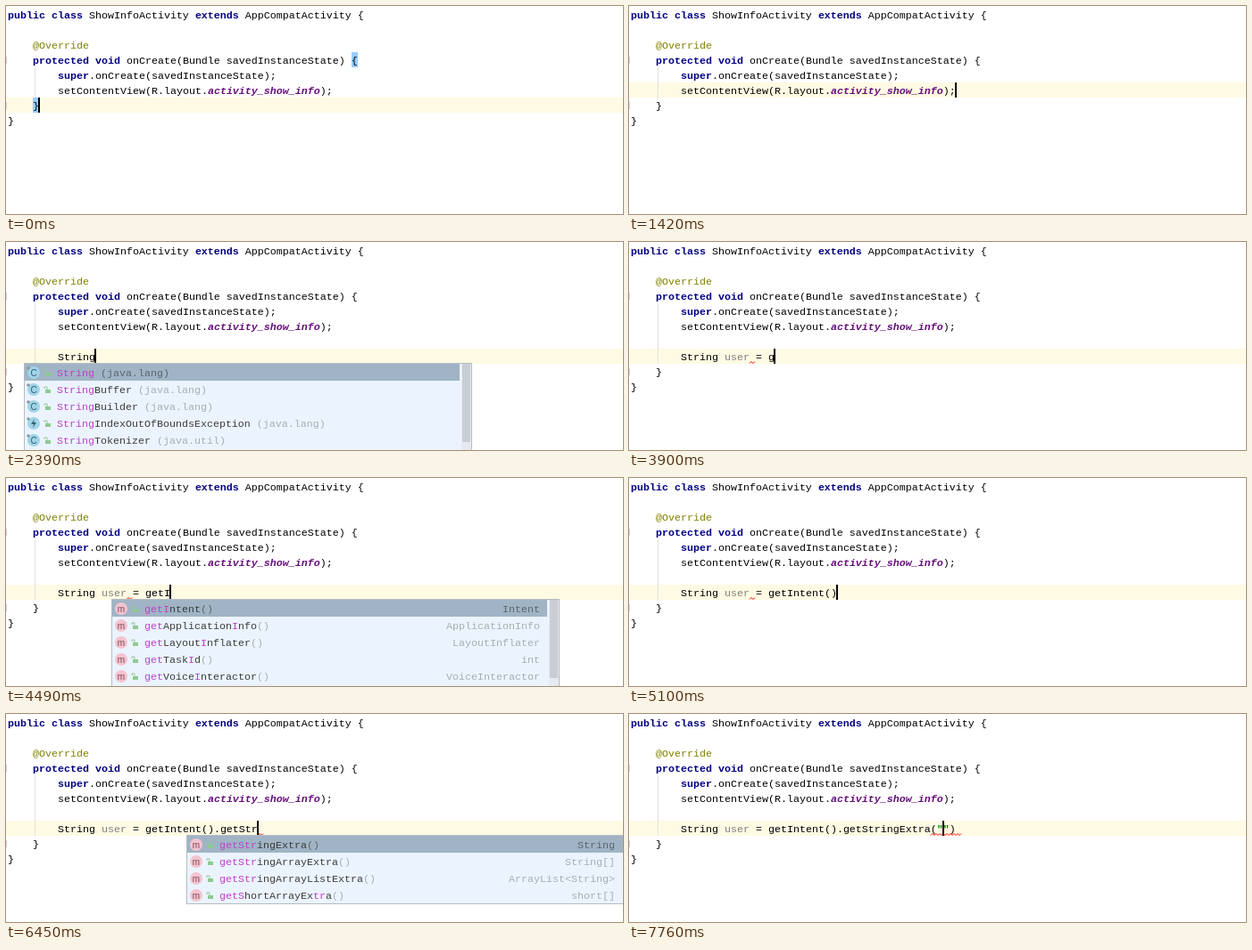
These frames come from a looping animation (691x234 px, 8 s). An HTML page:

```html
<!DOCTYPE html>
<html lang="en">
<head>
<meta charset="utf-8">
<title>Code completion</title>
<style>
  html, body { margin: 0; width: 100%; height: 100%; overflow: hidden; background: #fff; }
  svg { display: block; width: 691px; height: 234px; }
  text { font: 11.667px "Liberation Mono", "Courier New", monospace; white-space: pre; fill: #000; }
  .key { fill: #000080; font-weight: bold; }
  .note { fill: #808000; }
  .field { fill: #660e7a; font-weight: bold; font-style: italic; }
  .unused { fill: #808080; }
  .str { fill: #008000; font-weight: bold; }
  .item { fill: #3c3c3c; }
  .hit { fill: #c23fc9; }
  .tail { fill: #a8adb3; }
  .on .tail { fill: #5b656e; }
  .icon { font: 10px "Liberation Sans", Arial, sans-serif; text-anchor: middle; }
  .wave { fill: none; stroke: #f00; stroke-width: 1; }
</style>
</head>
<body>
<svg id="stage" viewBox="0 0 691 234"></svg>
<script>
const LOOP = 8000, CHAR = 7, ROW = 17, ITEM = 19, INDENT = 8, CODE_ROW = 7;
const stage = document.getElementById('stage');
const colX = col => 2 + CHAR * col;
const rowY = row => 1 + ROW * row;
const esc = s => s.replace(/&/g, '&amp;').replace(/</g, '&lt;');
const span = (cls, s) => `<tspan class="${cls}">${s}</tspan>`;
const rect = (x, y, w, h, fill) => `<rect x="${x}" y="${y}" width="${w}" height="${h}" fill="${fill}"/>`;
const line = (row, col, s) => `<text x="${colX(col)}" y="${rowY(row) + 13}">${s}</text>`;

const HEAD =
  line(0, 0, `${span('key', 'public class')} ShowInfoActivity ${span('key', 'extends')} AppCompatActivity {`) +
  line(2, 4, span('note', '@Override')) +
  line(3, 4, `${span('key', 'protected void')} onCreate(Bundle savedInstanceState) {`) +
  line(4, 8, `${span('key', 'super')}.onCreate(savedInstanceState);`) +
  line(5, 8, `setContentView(R.layout.${span('field', 'activity_show_info')});`);

// Suggestions as "name tail" pairs; methods show their return type at the right.
const LISTS = {
  classes: ['String (java.lang)', 'StringBuffer (java.lang)', 'StringBuilder (java.lang)',
    'StringIndexOutOfBoundsException (java.lang)', 'StringTokenizer (java.util)'],
  get: ['getIntent Intent', 'getString String', 'getResources Resources', 'getWindow Window', 'getTheme Theme'],
  getI: ['getIntent Intent', 'getApplicationInfo ApplicationInfo', 'getLayoutInflater LayoutInflater',
    'getTaskId int', 'getVoiceInteractor VoiceInteractor'],
  getIn: ['getIntent Intent', 'getApplicationInfo ApplicationInfo', 'getLayoutInflater LayoutInflater',
    'getVoiceInteractor VoiceInteractor', 'getParentActivityIntent Intent'],
  getInt: ['getIntent Intent', 'getVoiceInteractor VoiceInteractor', 'getParentActivityIntent Intent',
    'getSupportParentActivityIntent Intent'],
  data: ['getAction String', 'getDataString String', 'getData Uri', 'getPackage String', 'getScheme String'],
  getS: ['getScheme String', 'getStringExtra String', 'getSelector Intent', 'getShortExtra short',
    'getSerializableExtra Serializable'],
  getSt: ['getStringExtra String', 'getStringArrayExtra String[]', 'getStringArrayListExtra ArrayList<String>',
    'getShortExtra short', 'getShortArrayExtra short[]'],
  getStr: ['getStringExtra String', 'getStringArrayExtra String[]', 'getStringArrayListExtra ArrayList<String>',
    'getShortArrayExtra short[]']
};

const USER = 'String user', SET = USER + ' = ', CALL = SET + 'getIntent()', DOT = CALL + '.';
const steps = [];
// Adds a state; unset fields fall back to a caret at the end of the typed code.
const at = (time, code, opts = {}) => steps.push({ time, code, blanks: 2, row: CODE_ROW, back: 0, ...opts });
// Types a word with its suggestion list open.
const type = (base, list, wave, ...marks) => marks.forEach(([time, word]) =>
  at(time, base + word, { list: LISTS[word] && list !== 'data' || /^getS/.test(word) ? word : list, word, ...wave(base + word) }));
const none = () => ({});
const grey = { unused: true };
const mid = () => ({ ...grey, wave: [11, 7] });
const end = code => ({ ...grey, wave: [code.length, 7] });

at(0, '', { blanks: 0, row: 6, col: 5, braces: true });
at(660, '', { blanks: 0, row: 5, col: 52 });
at(1500, '', { blanks: 1, row: 6 });
at(1640, '');
type('', 'classes', none, [1790, 'S'], [1870, 'St'], [2010, 'Str'], [2170, 'Stri'], [2240, 'Strin'], [2310, 'String']);
at(2450, 'String ');
at(2610, 'String u');
at(2690, 'String use');
at(2750, USER);
at(3060, USER + ' ');
at(3130, USER + ' =');
at(3200, USER + ' =', mid());
at(3510, SET, mid());
at(3900, SET + 'g', mid());
type(SET, 'get', mid, [3960, 'g'], [4040, 'ge'], [4120, 'get'], [4490, 'getI'], [4650, 'getIn'], [4790, 'getInt']);
at(5100, CALL, mid());
at(5160, CALL, end(CALL));
at(5380, DOT, end(DOT));
type(DOT, 'data', end, [5460, ''], [5540, 'g'], [5600, 'ge'], [5760, 'get'], [6140, 'getS'], [6370, 'getSt'], [6450, 'getStr']);
const extra = DOT + 'getStringExtra()';
at(7450, extra, { ...end(extra), back: 1 });
at(7760, DOT + 'getStringExtra("")', { ...grey, back: 2, wave: [40, 34] });

function mark(name, word) {
  let n = 0;
  while (n < word.length && name[n] === word[n]) n++;
  const rest = word.slice(n), k = rest ? name.indexOf(rest, n) : -1;
  const tail = k < 0 ? name.slice(n)
    : name.slice(n, k) + span('hit', rest) + name.slice(k + rest.length);
  return span('hit', name.slice(0, n)) + tail;
}

function icon(x, y, kind) {
  const fill = kind === 'm' ? '#f3c4cf' : '#9fd4e9';
  const ink = kind === 'm' ? '#7c4655' : '#35606f';
  const sign = kind === 'bolt'
    ? `<path d="M${x + 1} ${y - 5}l-4 6h3l-1 4 4-6h-3z" fill="${ink}"/>`
    : `<text class="icon" x="${x}" y="${y + 3.5}" style="fill:${ink}">${kind}</text>`;
  const pin = kind === 'm' ? '' : `<circle cx="${x - 6}" cy="${y - 5}" r="1.7" fill="#8796a0"/>`;
  return `<circle cx="${x}" cy="${y}" r="7" fill="${fill}"/>${sign}${pin}` +
    rect(x + 13, y, 6, 4, '#8fca91') +
    `<path d="M${x + 12} ${y - 1}v-2h3v3" fill="none" stroke="#8fca91"/>`;
}

function popup({ code, list, word }) {
  const items = LISTS[list], methods = list !== 'classes', full = items.length > 4;
  const x = colX(INDENT + code.length - word.length) - 38, top = 137;
  const height = full ? 110 : items.length * ITEM;
  let out = rect(x, top - 1, 502, height + 2, '#b4bcc4') + rect(x + 1, top, 500, height, '#ebf4fe');
  items.forEach((entry, i) => {
    const cut = entry.indexOf(' '), name = entry.slice(0, cut), tail = esc(entry.slice(cut + 1));
    const y = top + ITEM * i, base = y + 14;
    const kind = methods ? 'm' : name.endsWith('Exception') ? 'bolt' : 'C';
    if (!i) out += rect(x + 1, y, full ? 487 : 500, ITEM, '#a0b4c5');
    out += `<g class="${i ? '' : 'on'}">` + icon(x + 11, y + 10, kind) +
      `<text class="item" x="${x + 37}" y="${base}">${mark(name, word)}${span('tail', methods ? '()' : ' ' + tail)}</text>` +
      (methods ? `<text class="tail" text-anchor="end" x="${x + 480}" y="${base}">${tail}</text>` : '') + '</g>';
  });
  if (full) out += rect(x + 490, top, 11, height, '#e6eaee') + rect(x + 491, top, 9, 88, '#c9ced3');
  return out;
}

function wavy([col, width]) {
  const x = colX(INDENT + col);
  let d = `M${x} 136.5`;
  for (let i = 2; i <= width; i += 2) d += `l2 ${i % 4 ? -2 : 2}`;
  return `<path class="wave" d="${d}"/>`;
}

function draw(s) {
  const close = 6 + s.blanks;
  const col = s.col ?? INDENT + s.code.length - s.back;
  let code = s.code;
  if (s.unused) code = code.replace('user', span('unused', 'user'));
  code = code.replace(/\(""\)$/, `(${span('str', '""')})`);

  let out = rect(0, rowY(s.row), 691, ROW, '#fffae3');
  if (s.braces) out += rect(387, rowY(3), 7, ROW, '#99ccff') + rect(30, rowY(6), 7, ROW, '#99ccff');
  out += rect(32, rowY(4), 1, ROW * (close - 4), '#e2e2e2');
  for (const row of [3, close]) out += rect(0, rowY(row) + 5, 1, 8, '#cfcfcf');
  out += HEAD + line(close, 4, '}') + line(close + 1, 0, '}');
  if (code) out += line(CODE_ROW, INDENT, code);
  if (s.wave) out += wavy(s.wave);
  out += rect(colX(col) - 1, rowY(s.row), 2, ROW, '#000');
  if (s.list) out += popup(s);
  stage.innerHTML = out;
}

let shown;
function tick() {
  const t = performance.now() % LOOP;
  const now = steps.findLast(s => s.time <= t);
  if (now !== shown) draw(shown = now);
  requestAnimationFrame(tick);
}
tick();
</script>
</body>
</html>
```
